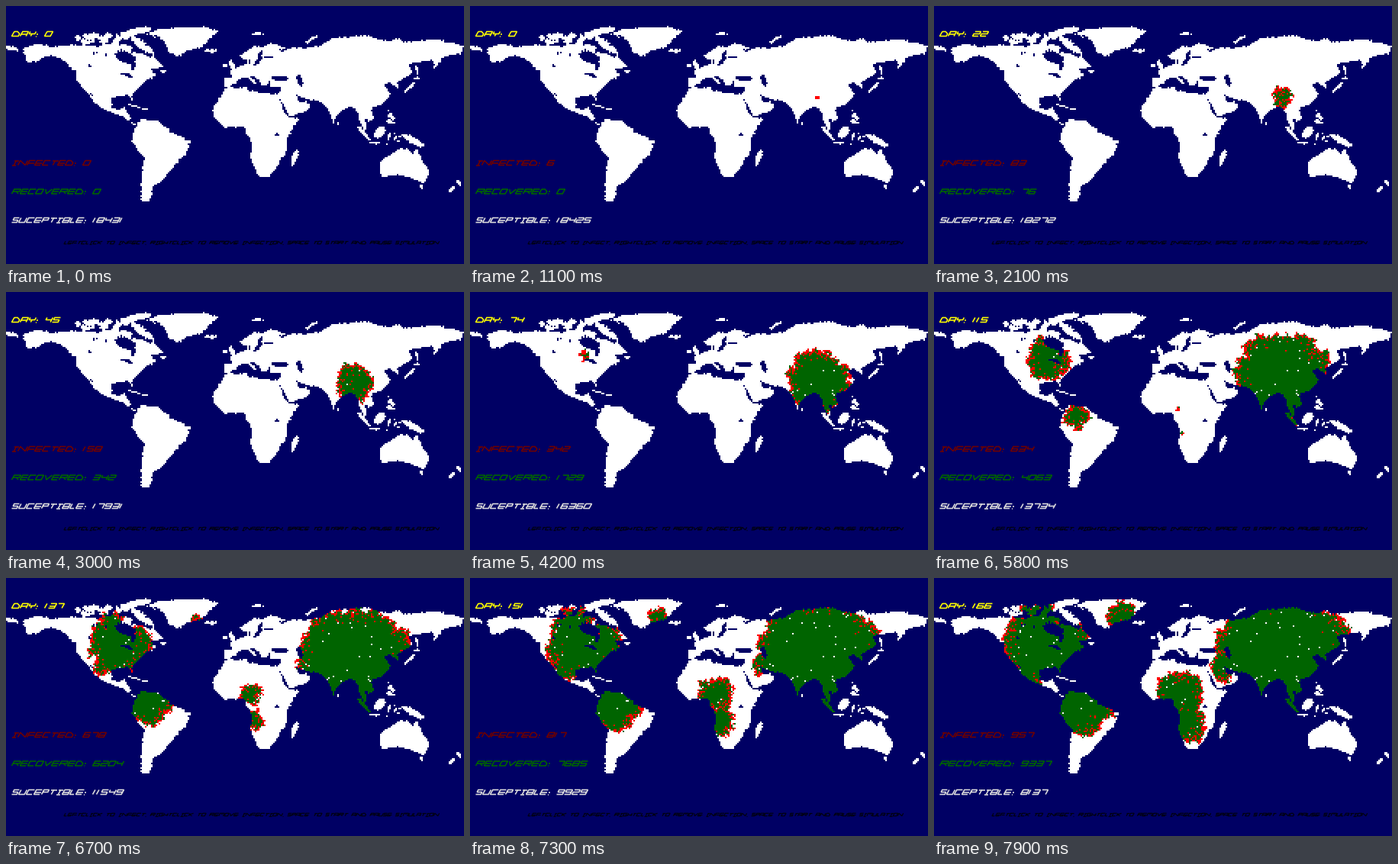
A matplotlib script that plays this animation: 600x338 px, repeating every 8000 ms.

```python
import numpy as np
import matplotlib.pyplot as plt
from matplotlib.animation import FuncAnimation
from matplotlib.collections import LineCollection
from matplotlib.path import Path

W, H, CELL = 600, 338, 2
FRAMES, STEP = 80, 100
ROWS, COLS = H // CELL, W // CELL
TOTAL = 18431
rng = np.random.default_rng(7)

# One pixel is 0.6 degrees; the equator lies at y = 167
row, col = np.indices((ROWS, COLS))
lon = (col * CELL + 1 - W / 2) * .6
lat = (167 - row * CELL - 1) * .6
rough = np.where(lat > 60, .4, .2)
pts = np.column_stack([(v + rng.normal(0, 1, v.shape) * rough).ravel()
                       for v in (lon, lat)])

# Key points (lon, lat); fractal coastlines fill in the rest
NORTH_AMERICA = [
    (-167, 66), (-156, 71), (-128, 70), (-95, 71), (-82, 69), (-72, 62),
    (-64, 60), (-56, 52), (-66, 50), (-62, 46), (-70, 42), (-76, 35),
    (-81, 31), (-80.5, 25.5), (-84, 30), (-97, 28), (-97, 20), (-91, 18.5),
    (-87, 21.3), (-83.5, 15), (-82, 9), (-77.5, 8), (-80, 7), (-87, 12.5),
    (-95, 16), (-105, 20), (-113, 31), (-117, 33), (-124, 41), (-124, 48),
    (-135, 58), (-148, 61), (-163, 55), (-165, 62)]
SOUTH_AMERICA = [
    (-77, 8), (-72, 12), (-61, 10), (-50, 1), (-35, -6), (-39, -17),
    (-48, -26), (-57, -37), (-65, -42), (-68, -54), (-74, -52), (-71, -19),
    (-76, -14), (-81, -5), (-79, 2)]
GREENLAND = [
    (-72, 78), (-58, 82), (-33, 83.5), (-13, 81.5), (-20, 75), (-23, 70),
    (-39, 65), (-44, 60), (-51, 63), (-54, 69), (-60, 76)]
EURASIA = [
    (-9, 37), (-9, 43.5), (-1.5, 44), (-4, 48.3), (5, 53), (9, 54.5),
    (10, 58), (5, 59), (5, 62), (14, 68), (27, 71), (41, 67), (68, 69),
    (72, 73), (104, 77.5), (113, 74), (140, 72), (180, 69), (178, 63),
    (163, 60), (157, 51), (155, 59), (136, 55), (140, 48), (128, 40),
    (129, 35), (126, 37), (121, 40), (118, 38), (122, 31), (117, 24),
    (107, 20), (109, 12), (105, 9), (101, 13), (103.5, 1.5), (98, 9),
    (97, 16), (91, 22), (80, 14), (77.5, 8), (73, 19), (67, 25), (57, 26.5),
    (48, 31), (36, 32), (36, 36.5), (27, 37), (27, 41), (24, 38), (21, 38),
    (19, 42), (13, 45.5), (9, 44), (3, 43), (0, 39), (-5, 36)]
ARABIA = [(35, 33), (35, 28), (43, 13), (52, 16), (59.5, 22), (56, 25.5),
          (51, 24.5), (48, 31)]
AFRICA = [
    (-6, 36), (10, 37), (11, 33.5), (20, 31.5), (34, 31), (37, 21), (43, 12),
    (51, 12), (40, -4), (40, -15), (35, -22), (27, -34), (18.5, -34),
    (12, -17), (13.5, -11), (9, 0), (8, 4.5), (-8, 4.5), (-17, 14),
    (-16.5, 22), (-10, 31)]
AUSTRALIA = [
    (114, -22), (115, -34.5), (129, -32), (138, -35), (147, -39), (153, -30),
    (146, -19), (142.5, -11), (140, -17.5), (136, -12), (131, -11.5),
    (125, -15)]
CONTINENTS = [NORTH_AMERICA, SOUTH_AMERICA, GREENLAND, EURASIA, ARABIA, AFRICA,
              AUSTRALIA]

# Ovals: lon, lat, half axes, tilt
SEAS = [
    (-86, 60, 8.5, 4.5, -20), (-80, 53, 3.5, 1.6, 90),    # Hudson Bay
    (-78, 66, 4, 2.5, 0), (-85, 46, 5, 1.1, -20),         # Foxe, Great Lakes
    (18, 57, 4.5, 1.7, 50), (20, 63, 3.5, 1.6, 60),       # Baltic
    (11.3, 57, 1.8, .9, 90), (26, 59.8, 4, .7, 0),
    (38, 65.5, 3, 1, 0), (35, 43.3, 6.5, 2, 0),           # White, Black
    (51, 42, 5.5, 2, 105), (33, -1, 1.3, 1.2, 0)]         # Caspian, Victoria
ISLANDS = [
    (-112, 27.5, 5, .9, -55), (-73, 69.5, 12, 2.8, -38),  # Baja, Baffin
    (-78, 80, 12, 2.6, 12), (-56, 49, 2.2, 1.5, 0),       # Ellesmere
    (-79.5, 21.8, 5, .8, -17), (-71, 19, 2.6, .9, 0),     # Caribbean
    (-19, 65, 4.5, 1.3, 0), (-2.5, 54, 4.5, 1.8, 110),    # Iceland, Britain
    (-8, 53.3, 1.8, 1.6, 0), (13.5, 42, 5.5, 1.1, -42),   # Ireland, Italy
    (18, 78.5, 5, 1.2, 0), (60, 74, 6, 1.1, 35),          # Svalbard, Novaya
    (-176, 67, 6, 1.5, -10), (46.8, -19, 7, 2, 70),       # Chukotka, Madagascar
    (137, 36, 6, 1.2, 42), (143, 43.4, 1.9, 1.3, 0),      # Japan
    (143, 50, 4.5, .8, 95), (81, 7.6, 1.5, 1, 90),        # Sakhalin, Ceylon
    (101.5, 0, 7.5, 1.4, -48), (110, -7.3, 5, .9, -5),    # Sumatra, Java
    (114, 1, 5.5, 3.5, 45), (121, -2, 3.2, 1, 80),        # Borneo, Celebes
    (140, -5.5, 10, 2.5, -28), (146.5, -42, 1.6, 1.4, 0),  # Papua, Tasmania
    (176, -38.7, 3.2, 1.2, -55), (170.5, -44, 4, 1.3, 45)]  # New Zealand


def coast(keys, depth=3):
    """Mask of a polygon roughened by midpoint displacement."""
    p = np.array(keys, float)
    for _ in range(depth):
        edge = np.roll(p, -1, 0) - p
        normal = edge[:, ::-1] * (-1, 1)
        mid = p + edge / 2 + normal * rng.normal(0, .05, (len(p), 1))
        p = np.stack([p, mid], 1).reshape(-1, 2)
    return Path(p).contains_points(pts).reshape(lon.shape)


def oval(cx, cy, a, b, tilt=0):
    c, s = np.cos(np.radians(tilt)), np.sin(np.radians(tilt))
    x, y = (pts - (cx, cy)).T
    inside = ((x * c + y * s) / a) ** 2 + ((y * c - x * s) / b) ** 2 < 1
    return inside.reshape(lon.shape)


def scatter(cx, cy, rx, ry, n, size):
    """Mask of n small ovals strewn over a box."""
    mask = np.zeros(lon.shape, bool)
    for _ in range(n):
        x, y = rng.uniform(-1, 1, 2) * (rx, ry)
        a, b = size * rng.uniform(.6, 1.3, 2)
        mask |= oval(cx + x, cy + y, a, b * .6, rng.uniform(-40, 40))
    return mask


def make_land():
    land = np.any([coast(keys) for keys in CONTINENTS], axis=0)
    land &= ~np.any([oval(*sea) for sea in SEAS], axis=0)
    land &= ~scatter(-108, 60, 14, 8, 6, 1.2)             # northern lakes
    land |= np.any([oval(*isle) for isle in ISLANDS], axis=0)
    land |= scatter(-104, 74, 20, 3.5, 22, 3)             # Arctic islands
    land |= scatter(123, 12, 2.5, 6, 11, 1.5)             # Philippines
    return land | scatter(124, -5, 6, 5, 9, 1.1)          # Moluccas


def spread(start, cost):
    t = start.copy()
    moves = [(a, b) for a in (-1, 0, 1) for b in (-1, 0, 1) if a or b]
    for _ in range(200):
        for a, b in moves:
            t = np.minimum(t, np.roll(t, (a, b), (0, 1)) + cost * np.hypot(a, b))
    return t


def infection_times(land):
    blocks = np.kron(rng.uniform(.7, 1.3, (43, 75)), np.ones((4, 4)))
    cost = blocks[:ROWS, :COLS] * rng.uniform(.3, 1.7, land.shape)
    cost[~land | (rng.random(land.shape) < .012)] = np.inf

    first = np.full(land.shape, np.inf)
    first[59:61, 226:229] = 0
    dist = np.hypot(row - 59.5, col - 227)
    trial = spread(first, cost)
    ring = (dist > 8) & (dist < 28) & np.isfinite(trial)
    cost *= 1.42 / np.median(trial[ring] / dist[ring])  # frames per cell

    start = first + 11.6
    for x, y, when in [(150, 82, 36), (186, 163, 46), (319, 152, 56),
                       (325, 185, 56), (249, 51, 64)]:
        start[y // CELL, x // CELL] = when
    t = spread(start, cost)
    heal = t + rng.exponential(3, land.shape)
    t[first == 0] = 9
    return t, heal


# Stroke font on a 3 x 3 node grid, a-i from top left
GLYPHS = {
    "0": "aciga", "1": "ag", "2": "acfdgi", "3": "acig fd", "4": "adf ci",
    "5": "cadfig", "6": "cagifd", "7": "aci", "8": "aciga df", "9": "fdacig",
    "A": "gaci df", "B": "aciga df", "C": "cagi", "D": "abfiga", "E": "cagi df",
    "F": "cag df", "G": "cagife", "H": "ag ci df", "I": "ac bh gi",
    "K": "ag cdi", "L": "agi", "M": "gaci be", "N": "gaic", "O": "aciga",
    "P": "gacfd", "R": "gacfd ei", "S": "cadfig", "T": "ac bh", "U": "agic",
    "V": "ahc", "Y": "adfc eh", ":": "d g", ",": "g"}
ADVANCE = {ch: adv for chars, adv in [(",", 3), (":", 4), ("1", 5), (" IL", 8),
                                      ("SP", 9), ("RVD", 11), ("NM", 12)]
           for ch in chars}


def strokes(text, x, y, size=1.0):
    """Polylines for slanted text, y is the middle of the line."""
    out = []
    for ch in text:
        adv = ADVANCE.get(ch, 10)
        half = (adv - 2.4) / 2
        for part in GLYPHS.get(ch, "").split():
            nodes = [divmod(ord(c) - 97, 3) for c in part]
            line = [(x + (u * half + (1 - v) * 1.7 + 1.7) * size,
                     y + (v - 1) * 3 * size) for v, u in nodes]
            if len(line) == 1:  # dot
                line.append((line[0][0] + 1.5 * size, line[0][1]))
            out.append(line)
        x += adv * size
    return out


# Frame, day, infected, ever infected
KEYS = np.array([(8, 0, 0, 0), (9, 0, 6, 6), (11.6, 0, 6, 6),
                 (30, 45, 158, 500), (42, 74, 342, 2071), (58, 115, 634, 4697),
                 (67, 137, 678, 6882), (79, 166, 957, 10294)]).T


def counts(i):
    day, sick = (int(np.interp(i, KEYS[0], k)) for k in KEYS[1:3])
    total = round(np.interp(i, KEYS[0], np.sqrt(KEYS[3])) ** 2)
    sick = min(sick, total)
    return day, sick, total - sick, TOTAL - total


land = make_land()
caught, healed = infection_times(land)
PALETTE = np.array([(0, 0, 100), (255, 255, 255), (255, 0, 0), (0, 100, 0)], np.uint8)

fig = plt.figure(figsize=(W / 100, H / 100), dpi=100)
ax = fig.add_axes([0, 0, 1, 1])
ax.axis("off")
world = ax.imshow(PALETTE[land.astype(int)], extent=(0, W, H, 0),
                  interpolation="nearest", aspect="auto")


def add_text(color, width):
    lines = LineCollection([], colors=color, linewidths=width * .72,
                           capstyle="butt", joinstyle="miter")
    return ax.add_collection(lines, autolim=False)


LABELS = [("DAY: ", 36.5, "#ffff00"), ("INFECTED: ", 205.5, "#6e0000"),
          ("RECOVERED: ", 243, "#006400"), ("SUCEPTIBLE: ", 280.5, "#dcdcdc")]
rows = [add_text(color, 1.6) for _, _, color in LABELS]
hint = add_text("#000010", 1.2)
hint.set_segments(strokes(
    "LEFTCLICK TO INFECT, RIGHTCLICK TO REMOVE INFECTION, "
    "SPACE TO START AND PAUSE SIMULATION", 76, 310, .591))
ax.set_xlim(0, W)
ax.set_ylim(H, 0)


def update(i):
    state = land.astype(int)
    state[land & (caught <= i)] = 2
    state[land & (healed <= i)] = 3
    world.set_data(PALETTE[state])
    for line, (label, y, _), value in zip(rows, LABELS, counts(i)):
        line.set_segments(strokes(f"{label}{value}", 7.5, y))
    return [world, hint, *rows]


anim = FuncAnimation(fig, update, frames=FRAMES, interval=STEP, repeat=True,
                     repeat_delay=0)
plt.show()
```
